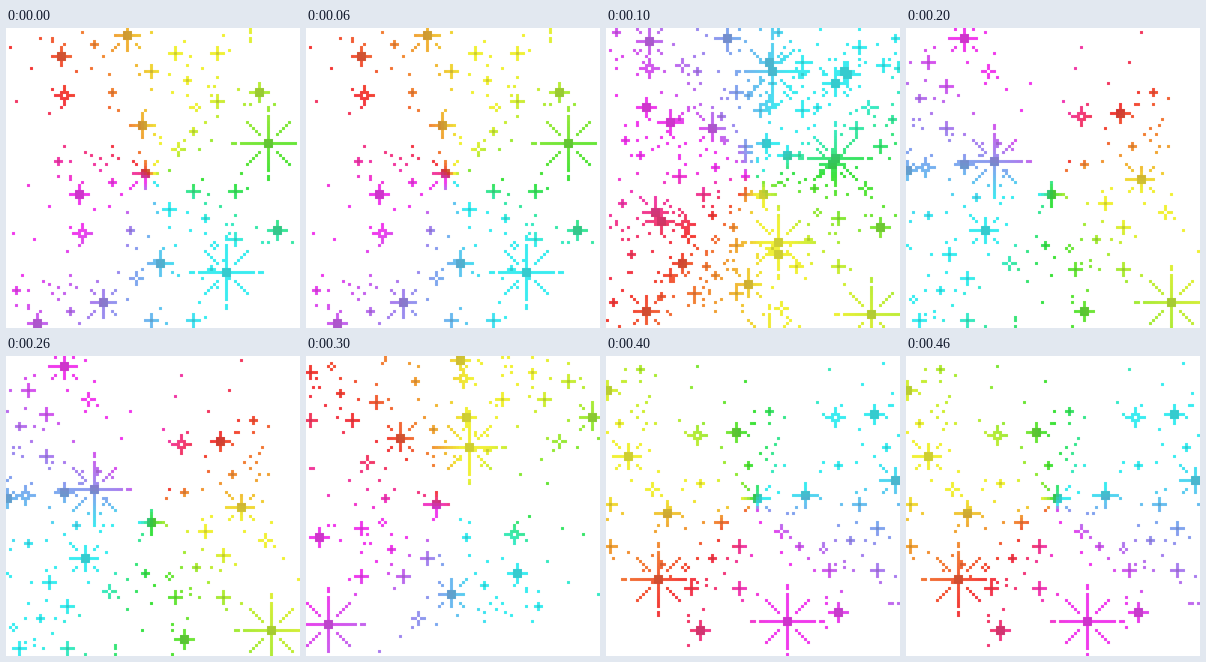
These frames come from a looping animation (392 by 400 pixels, 500 ms). An HTML page with a canvas:

```html
<!DOCTYPE html>
<html lang="en">
<head>
<meta charset="utf-8">
<title>Rainbow sparkles</title>
<style>
html, body { margin: 0; width: 100%; height: 100%; overflow: hidden; background: #fff; }
canvas { display: block; }
</style>
</head>
<body>
<canvas id="stage" width="392" height="400"></canvas>
<script>
const CELL = 4, COLS = 98, ROWS = 100, STEP = 100;
const ctx = document.getElementById('stage').getContext('2d');

// Sparkle shapes: arm and diagonal cells from..to, and the core
const KINDS = {
  big:    { arm: [1, 12], gap: 10, diag: [3, 7], core: 'block' },
  medium: { arm: [1, 4], diag: [3, 4], core: 'block' },
  wide:   { arm: [1, 4], core: 'block' },
  fat:    { arm: [1, 3], core: 'block' },
  ring:   { arm: [2, 3], core: 'ring' },
  plus:   { arm: [1, 2], core: 'dot' },
  small:  { arm: [1, 1], core: 'dot' },
  open:   { arm: [1, 2] },
  tiny:   { arm: [1, 1] },
  apart:  { arm: [2, 2] }
};

// One spray of sparkles, in cells from its largest star
const STARS = {
  big: [[0, 0]],
  medium: [[-41, 10]],
  wide: [[-36, 40]],
  fat: [[3, 29], [-63, 17]],
  ring: [[-62, 30]],
  plus: [[-11, 16], [-25, 16], [-11, 32], [-33, 22]],
  small: [[-21, 25], [-52, 13], [-46, 29], [-19, 42], [-70, 6]],
  open: [[-30, 2]],
  tiny: [[-18, 34]],
  apart: [[-56, 7]]
};

// The loose dots that stand alone at the rim of the spray
const RIM = [[-90, 10], [-85, 30], [-80, 14], [-78, 32], [-73, 21], [-66, 11], [-59, 4],
  [-52, 1], [-17, -9], [-26, -12], [-24, -4], [8, 33]];

const upright = (x, y) => [x, y];
const flip = (x, y) => [x, -y];
const quarter = (x, y) => [-y, x];
const half = (x, y) => [-x, -y];

// turn moves the spray, tint turns the rainbow, at places the sprays
const SCENES = [
  { turn: upright, tint: upright, at: [[87, 38], [73, 81], [81, -8]] },
  { turn: flip, tint: flip,
    at: [[55, 14], [76, 43], [57, 71], [88, 95], [54, 104], [116, 55], [117, 28]] },
  { turn: quarter, tint: (x, y) => [y, -x], at: [[29, 44], [88, 91], [36, 108]] },
  { turn: half, tint: upright, at: [[7, 89], [54, 30], [-10, 37]] },
  { turn: quarter, tint: quarter, at: [[60, 88], [17, 74], [106, 82]] }
];

const RED = [243, 62, 58], YELLOW = [240, 240, 58], GREEN = [62, 226, 62],
  CYAN = [62, 236, 240], MAGENTA = [240, 62, 236];

// Clockwise degrees from the top
const RAINBOW = [
  [-47, RED], [8, YELLOW], [30, YELLOW], [92, GREEN], [130, CYAN], [160, CYAN],
  [235, MAGENTA], [262, MAGENTA], [313, RED]
];

function colour(x, y, shade) {
  const deg = Math.atan2(x, -y) * 180 / Math.PI;
  const a = deg < -47 ? deg + 360 : deg;
  const i = Math.max(1, RAINBOW.findIndex(s => s[0] >= a));
  const [a0, c0] = RAINBOW[i - 1], [a1, c1] = RAINBOW[i];
  const k = (a - a0) / (a1 - a0);
  return `rgb(${c0.map((v, n) => Math.round((v + (c1[n] - v) * k) * shade))})`;
}

function seeded(seed) {
  return () => {
    seed = (seed * 1664525 + 1013904223) % 4294967296;
    return seed / 4294967296;
  };
}

function shape({ arm, gap, diag = [1, 0], core }) {
  const light = [], dark = [];
  for (let n = arm[0]; n <= arm[1]; n++) {
    if (n !== gap) light.push([n, 0], [-n, 0], [0, n], [0, -n]);
  }
  for (let n = diag[0]; n <= diag[1]; n++) light.push([n, n], [-n, n], [n, -n], [-n, -n]);
  if (core === 'dot') dark.push([0, 0]);
  if (core === 'block' || core === 'ring') {
    for (let x = -1; x < 2; x++) {
      for (let y = -1; y < 2; y++) {
        if (core === 'block') dark.push([x, y]);
        else if (x || y) light.push([x, y]);
      }
    }
  }
  return { light, dark };
}

function buildSpray() {
  const rand = seeded(11);
  const light = [...RIM], dark = [];
  for (const kind in STARS) {
    const parts = shape(KINDS[kind]);
    for (const [sx, sy] of STARS[kind]) {
      const shift = ([x, y]) => [sx + x, sy + y];
      light.push(...parts.light.map(shift));
      dark.push(...parts.dark.map(shift));
      // a few loose dots around every lesser star
      for (let n = 0; n < 3 && kind !== 'big'; n++) {
        const a = rand() * Math.PI * 2, r = 4 + rand() * 4;
        light.push(shift([Math.round(r * Math.cos(a)), Math.round(r * Math.sin(a))]));
      }
    }
  }
  return { light, dark };
}

const SPRAY = buildSpray();

function drawCells(cells, shade, { turn, tint, at }) {
  for (const [bx, by] of at) {
    for (const [x, y] of cells) {
      const [tx, ty] = turn(x, y);
      const cx = bx + tx, cy = by + ty;
      if (cx < 0 || cy < 0 || cx >= COLS || cy >= ROWS) continue;
      ctx.fillStyle = colour(...tint(cx + 0.5 - COLS / 2, cy + 0.5 - ROWS / 2), shade);
      ctx.fillRect(cx * CELL, cy * CELL, CELL, CELL);
    }
  }
}

function drawScene(scene) {
  ctx.fillStyle = '#fff';
  ctx.fillRect(0, 0, COLS * CELL, ROWS * CELL);
  drawCells(SPRAY.light, 1, scene);
  drawCells(SPRAY.dark, 0.86, scene);
}

const start = performance.now();
let shown = -1;
function tick() {
  const t = Math.max(0, performance.now() - start);
  const i = Math.floor(t / STEP) % SCENES.length;
  if (i !== shown) drawScene(SCENES[shown = i]);
  requestAnimationFrame(tick);
}
tick();
</script>
</body>
</html>
```
